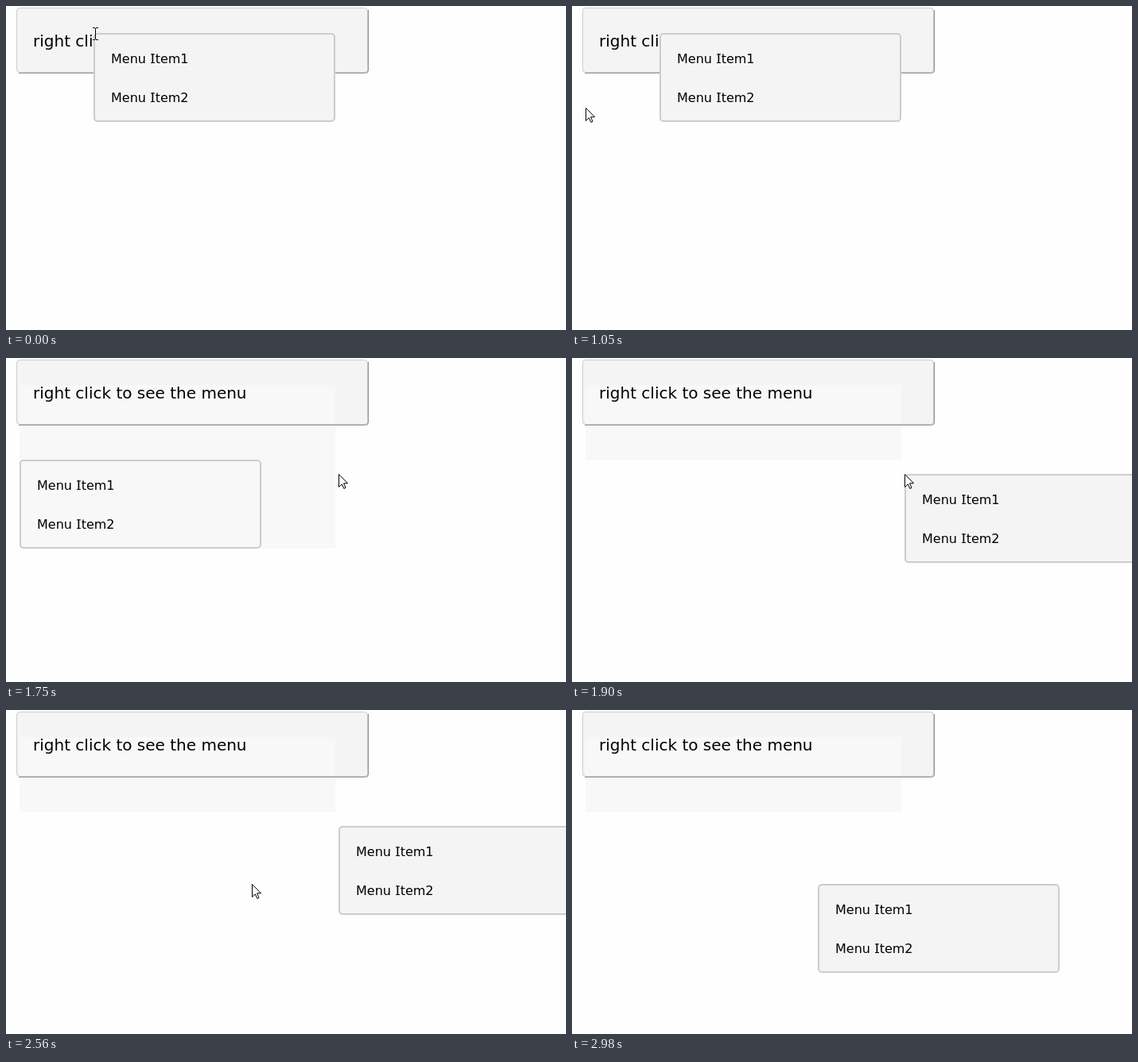
Write an HTML page that moves like this. It is 704 px wide and 408 px high and loops after 3.54 s.

```html
<!DOCTYPE html>
<html lang="en">
<head>
<meta charset="utf-8">
<title>Context menu</title>
<style>
  html, body { margin: 0; width: 100%; height: 100%; overflow: hidden; background: #fefefe; }
  svg { display: block; }
  text { font-family: Verdana, "DejaVu Sans", sans-serif; fill: #000; }
  path, .line { fill: none; }
</style>
</head>
<body>
<svg width="704" height="408" viewBox="0 0 704 408">
  <rect width="704" height="408" fill="#fefefe"/>
  <rect x="13" y="2" width="442" height="82" rx="4" fill="#f4f4f4"/>
  <rect id="residue" x="17" y="34" width="397" fill="#f8f8f8"/>
  <rect class="line" x="13.5" y="2.5" width="441" height="81" rx="4" stroke="#ccc"/>
  <path d="M455.5 5V80Q455.5 84.5 451 84.5H16" stroke="#959595" stroke-width="1.2"/>
  <text x="34" y="51" font-size="20">right click to see the menu</text>

  <g id="menu" font-size="16">
    <rect id="menuBox" x="1" y="1" width="302" height="110" rx="4" stroke="#ccc" stroke-width="2"/>
    <text x="22" y="38">Menu <tspan dx=".9">I</tspan><tspan dx="1">tem1</tspan></text>
    <text x="22" y="87">Menu <tspan dx=".9">I</tspan><tspan dx="1">tem2</tspan></text>
    <path d="M72 26.9h5m-5 10.6h5M72 75.9h5m-5 10.6h5" stroke="#000"/>
  </g>

  <path id="arrow" d="M.5.5V16.5L4.3 12.8 6.8 18.4 9 17.5 6.6 11.8H11.5Z" stroke="#000" style="fill:#fff"/>
  <path id="beam" d="M-3 -7.5h3m1 0h3M.5 -7V7M-3 7.5h3m1 0h3" stroke="#000"/>
</svg>
<script>
const LOOP = 3540;
const el = id => document.getElementById(id);

// [start ms, x, y, cursor kind]
const cursorSteps = [
  [0, 112, 35, "beam"], [140, 104, 42, "beam"], [260, 68, 70, "arrow"],
  [380, 22, 100, "arrow"], [500, -7, 116, "arrow"], [630, 0, 0, "none"],
  [900, -3, 116, "arrow"], [1050, 17, 128, "arrow"], [1330, 20, 129, "arrow"],
  [1480, 98, 141, "arrow"], [1630, 270, 150, "arrow"], [1750, 418, 146, "arrow"],
  [2020, 448, 148, "arrow"], [2170, 487, 200, "arrow"], [2290, 452, 261, "arrow"],
  [2410, 374, 240, "arrow"], [2560, 309, 219, "arrow"],
  [2830, 390, 310, "beam"], [2980, 0, 0, "none"]
];

// [start ms, x, y, fill, bottom of the lighter patch left on the page]
const menuSteps = [
  [0, 110, 34, "#f4f4f4", 34],
  [1330, 17, 128, "#f8f8f8", 240],
  [1900, 418, 146, "#f4f4f4", 128],
  [2680, 309, 219, "#f4f4f4", 128]
];

const stepAt = (steps, t) => steps.filter(([start]) => start <= t).pop();
const place = (node, x, y) => node.setAttribute("transform", `translate(${x} ${y})`);

function render(t) {
  const [, mx, my, fill, bottom] = stepAt(menuSteps, t);
  place(el("menu"), mx, my);
  el("menuBox").setAttribute("fill", fill);
  el("residue").setAttribute("height", bottom - 34);

  const [, cx, cy, kind] = stepAt(cursorSteps, t);
  for (const id of ["arrow", "beam"]) {
    place(el(id), cx, cy);
    el(id).setAttribute("visibility", id === kind ? "visible" : "hidden");
  }
}

const begin = performance.now();
function tick() {
  render((performance.now() - begin) % LOOP);
  requestAnimationFrame(tick);
}
tick();
</script>
</body>
</html>
```
